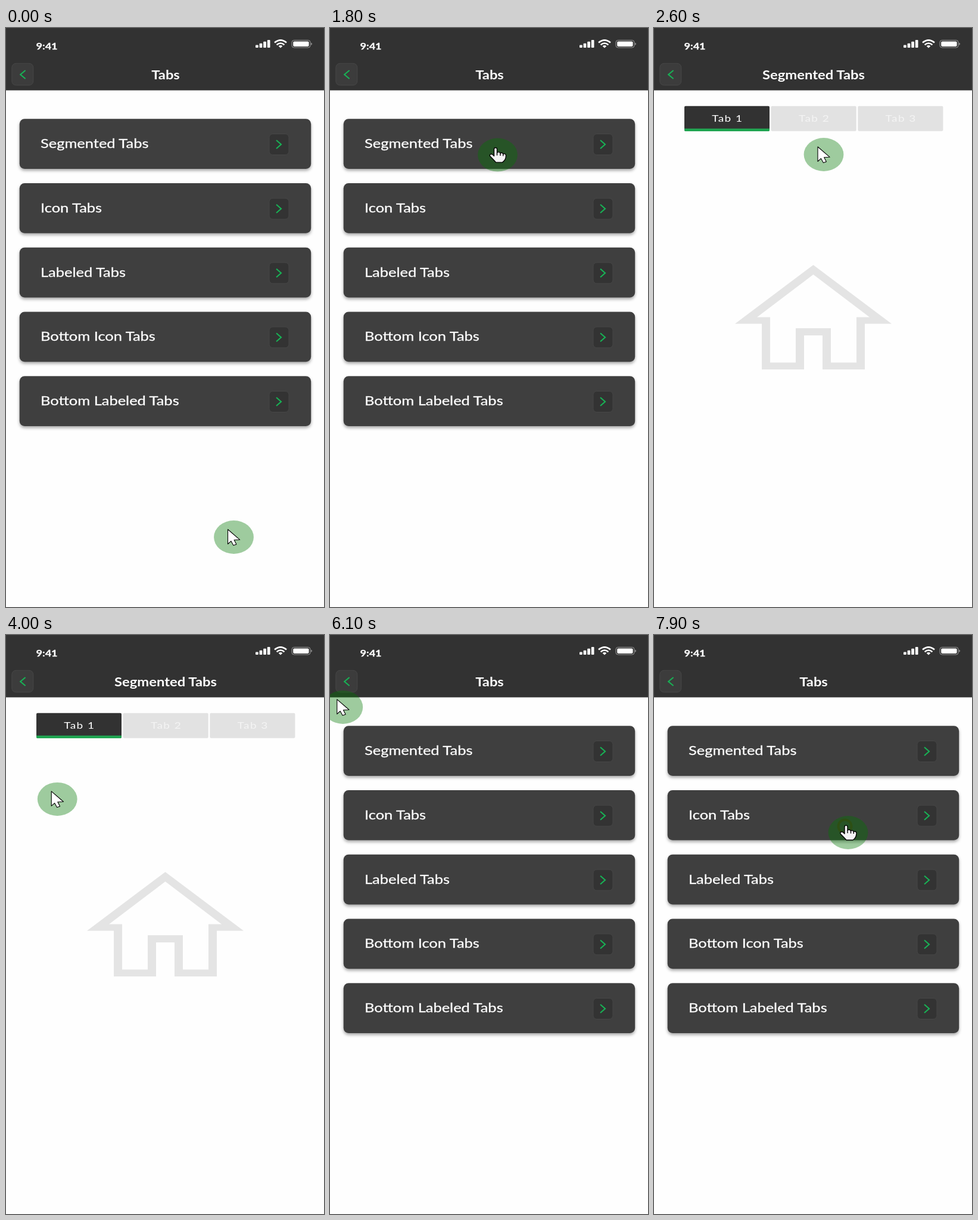
Write an HTML page that moves like this. It is 534x970 px and loops after 8 s.

```html
<!DOCTYPE html>
<html lang="en">
<head>
<meta charset="utf-8">
<title>Tabs</title>
<style>
  html, body { margin: 0; width: 100%; height: 100%; overflow: hidden; background: #fefefe; }
  svg { display: block; width: 100%; height: 100%; }
  text { font-family: Lato, "Open Sans", sans-serif; stroke: currentColor; stroke-width: .3px; }
  .title { font-size: 20px; font-weight: 700; text-anchor: middle; stroke: none; }
  .item { font-size: 21.4px; }
  .tab { font-size: 16px; letter-spacing: 1.2px; text-anchor: middle; stroke: none; }
  .clock { font-size: 15.2px; font-weight: 700; }
  svg { color: #fff; }
  .card { fill: #3f3f3f; filter: drop-shadow(0 3px 2.5px rgba(0, 0, 0, .34)); }
  .chev { fill: none; stroke: #18b255; stroke-width: 2.1; }
</style>
</head>
<body>
<svg viewBox="0 0 534 970">
  <rect width="534" height="970" fill="#fefefe"/>
  <g id="list"></g>
  <g id="detail"></g>

  <g id="status" fill="#fff">
    <g fill="none" stroke="#fff" stroke-width="2.6">
      <path d="M451 24.6Q461 16.2 471 24.6"/>
      <path d="M454.6 28.2Q461 22.8 467.4 28.2"/>
    </g>
    <path d="M457.6 30.3Q461 27.6 464.4 30.3L461 33.4Z"/>
    <rect x="480" y="20.5" width="31" height="12.4" rx="3.6" fill="none" stroke="#9a9a9a"/>
    <rect x="482.2" y="22.4" width="26.4" height="8.7" rx="2"/>
    <path d="M512.4 24.6q3 2.1 0 4.3z" fill="#aaa"/>
  </g>

  <rect x="9.8" y="59.3" width="36" height="36.6" rx="7" fill="#3c3c3c" stroke="#474747"/>
  <path class="chev" d="M32.6 71L24.2 78L32.6 85"/>

  <circle id="ring" fill="none" stroke="#50320a" stroke-width="4" stroke-opacity=".55"/>
  <g id="cursor">
    <ellipse rx="33.4" ry="28" fill="#007600" fill-opacity=".38"/>
    <path id="arrow" fill="#fff" stroke="#000" stroke-width="1.1" stroke-linejoin="round"
      d="M-10-13V11.5L-4.6 6.6L-.6 13.8L4.4 12L.6 4.8L10.2 4.3Z"/>
    <g id="hand" fill="#f4f4f4" stroke="#000" stroke-width="1.4" stroke-linejoin="round">
      <path d="M-6-9.5C-6-13-1-13-1-9.5V-3.5C0-5.5 4-5 4.5-2.5C5.5-4.2 9-3.5 9.2-1.2C10.5-2.5 14-2 14 1C14 7 12 10 8 12.5H-3C-6 9-9 6-12.5 2.5C-15-1-10-2.5-8 0L-6 2Z"/>
      <path fill="none" d="M-1-3.5V1M4.5-2.5V1.5M9.2-1.2V2"/>
    </g>
  </g>
</svg>
<script>
const LOOP = 8000, STEP = 100;
const STRETCH = 1.19; // the whole screen is wider than its design
const $ = id => document.getElementById(id);

const label = (cls, x, y, s, fill = '#fff') =>
  `<text class="${cls}" fill="${fill}" transform="translate(${x} ${y}) scale(${STRETCH} 1)">${s}</text>`;

const header = title => `<rect width="534" height="104" fill="#323232"/>
  <rect y="104" width="534" height="1" fill="#a0a0a0"/>${label('title', 268, 86, title)}`;

const card = (name, i) => `<g transform="translate(0 ${107.75 * i})">
  <rect class="card" x="22.7" y="152.2" width="489.5" height="83.8" rx="8.5"/>
  ${label('item', 58, 201, name)}
  <rect x="442" y="177.5" width="33" height="35" rx="6" fill="#333" stroke="#464646"/>
  <path class="chev" d="M454 188L462 195L454 202"/></g>`;

const tab = i => {
  const x = 51 + 145.7 * i, on = i === 0;
  return `<rect x="${x}" y="130.7" width="143" height="42" rx="2" fill="${on ? '#323232' : '#e2e2e2'}"/>` +
    (on ? `<path d="M${x} 168.6h143v2.4q0 2-2 2h-139q-2 0-2-2z" fill="#1fa551"/>` : '') +
    label('tab', x + 72.3, 157, `Tab ${i + 1}`, on ? '#fff' : '#f4f4f4');
};

const bar = i => {
  const h = 4.5 + 2.85 * i;
  return `<rect x="${419 + 6.6 * i}" y="${33 - h}" width="4.7" height="${h}" rx="1"/>`;
};

const names = ['Segmented Tabs', 'Icon Tabs', 'Labeled Tabs', 'Bottom Icon Tabs', 'Bottom Labeled Tabs'];
$('list').innerHTML = header('Tabs') + names.map(card).join('');
$('detail').innerHTML = `<rect y="105" width="534" height="865" fill="#fefefe"/>
  ${header(names[0])}${[0, 1, 2].map(tab).join('')}
  <path fill="#e4e4e4" fill-rule="evenodd" d="M267.5 397L399 495.5H354V572H283V515H252V572H181V495.5H136Z
    M267.5 413L173 484.5H195V560.5H238V503H297V560.5H340V484.5H362Z"/>`;
$('status').insertAdjacentHTML('beforeend',
  [0, 1, 2, 3].map(bar).join('') + label('clock', 50.5, 35.6, '9:41'));

// each move runs from the last place along a Bezier curve: start, end, control points, goal
const home = [382.5, 853];
const moves = [
  [200, 1360, [100, 640], [63, 426], [279, 213]],
  [1400, 2300, [285, 212]],
  [3100, 5030, [80, 284], [11, 347], [25.5, 85]],
  [5300, 5600, [31, 86]],
  [5970, 7100, [-67, 420], [230, 295], [292, 331]],
  [7100, 7400, [326, 331]]
];

const clamp = v => Math.min(1, Math.max(0, v));
const progress = (t, start, end) => clamp((t - start) / (end - start));
const smooth = u => u * u * (3 - 2 * u);
const mix = (a, b, s) => a.map((v, i) => v + (b[i] - v) * s);

function bezier(points, s) {
  while (points.length > 1) points = points.slice(1).map((p, i) => mix(points[i], p, s));
  return points[0];
}

const pointer = t => moves.reduce(
  (at, [start, end, ...points]) => bezier([at, ...points], smooth(progress(t, start, end))), home);

const fade = (t, start) => progress(t, start, start + 354);
const show = (id, on) => $(id).setAttribute('visibility', on ? 'visible' : 'hidden');

const clicks = [[2000, 273, 200], [5400, 18, 73], [7800, 320.5, 320.5]];
const handSpans = [[600, 2100], [5000, 5600], [6300, LOOP]];

function draw(time) {
  const t = Math.floor((time % LOOP) / STEP) * STEP;

  $('detail').setAttribute('opacity', fade(t, 2100) - fade(t, 5600));

  const [x, y] = pointer(t);
  $('cursor').setAttribute('transform', `translate(${x} ${y})`);
  const hand = handSpans.some(([a, b]) => t >= a && t < b);
  show('hand', hand);
  show('arrow', !hand);

  // the click ring shrinks away
  const click = clicks.find(([start]) => t >= start && t < start + 500);
  show('ring', click);
  if (click) {
    const [start, cx, cy] = click;
    $('ring').setAttribute('cx', cx);
    $('ring').setAttribute('cy', cy);
    $('ring').setAttribute('r', 12.5 - 0.015 * (t - start));
  }
}

const start = performance.now();
function tick() {
  draw(performance.now() - start);
  requestAnimationFrame(tick);
}
tick();
</script>
</body>
</html>
```
